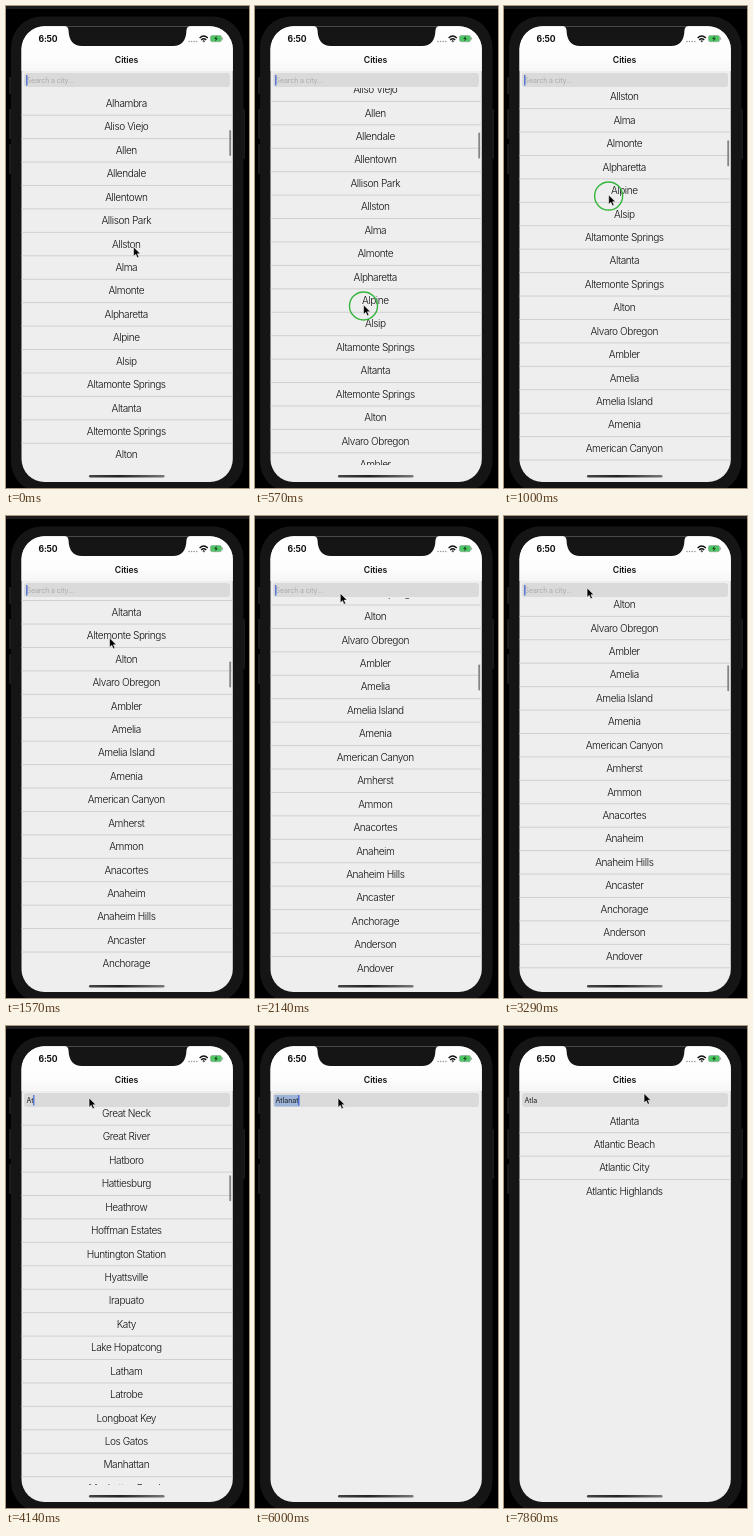
Recreate the animation shown at these times as an HTML page. Size 243 by 482 pixels, loop 8000 ms.

```html
<!DOCTYPE html>
<html lang="en">
<head>
<meta charset="utf-8">
<title>City search</title>
<style>
  html, body { margin: 0; width: 100%; height: 100%; overflow: hidden; background: #000; }
  svg { display: block; width: 100%; height: 100%; font-family: Inter, Roboto, sans-serif; }
  .row { font-size: 10.1px; font-weight: 300; letter-spacing: -.43px; text-anchor: middle; fill: #111; }
  .sep { stroke: #d0d0d0; stroke-width: 1; }
  .field { font-size: 7px; }
</style>
</head>
<body>
<svg viewBox="0 0 243 482" preserveAspectRatio="none">
  <defs>
    <linearGradient id="nav" x1="0" y1="0" x2="0" y2="1">
      <stop offset="0" stop-color="#fff"/>
      <stop offset=".7" stop-color="#fdfdfd"/>
      <stop offset="1" stop-color="#f6f6f6"/>
    </linearGradient>
    <linearGradient id="gloss">
      <stop offset="0" stop-color="#444"/>
      <stop offset=".4" stop-color="#222"/>
      <stop offset="1" stop-color="#777"/>
    </linearGradient>
    <clipPath id="screen"><rect x="15.5" y="20.3" width="211.300" height="455.700" rx="23"/></clipPath>
    <clipPath id="list"><rect x="15" y="82" width="212" height="377"/></clipPath>
  </defs>

  <rect width="243" height="482" fill="#000"/>
  <rect width="243" height="3" fill="#1c1c1c"/>
  <g fill="#1b1b1b">
    <rect x="3" y="71" width="4" height="17" rx="1"/>
    <rect x="3" y="103" width="4" height="30" rx="1"/>
    <rect x="3" y="138" width="4" height="30" rx="1"/>
    <rect x="235" y="103" width="4" height="50" rx="1"/>
  </g>
  <rect x="5" y="10.5" width="232.5" height="476" rx="31" fill="#151515"/>

  <g clip-path="url(#screen)">
    <rect x="15" y="20" width="212" height="456" fill="#eeeeee"/>
    <rect x="15" y="20" width="212" height="45" fill="url(#nav)"/>
    <g clip-path="url(#list)">
      <g id="all"></g>
      <g id="at"></g>
      <g id="atla"></g>
    </g>
    <rect id="bar" x="223.300" width="1.800" height="26" rx=".9" fill="#858585"/>
    <path d="M59 20Q62 20.5 62.500 24Q63 40 76 40H167Q180 40 180.500 24Q181 20.500 184 20Z" fill="#151515"/>
  </g>

  <text x="32.5" y="35.800" font-size="8.6" font-weight="700" fill="#111" letter-spacing="-.2">6:50</text>
  <g fill="#999">
    <circle cx="183" cy="35.500" r=".8"/><circle cx="185.600" cy="35.500" r=".8"/>
    <circle cx="188.200" cy="35.500" r=".8"/><circle cx="190.800" cy="35.500" r=".8"/>
  </g>
  <g fill="none" stroke="#111" stroke-width="1.4">
    <path d="M193.600 32Q197.700 28.200 201.800 32"/>
    <path d="M195.200 33.900Q197.700 31.600 200.200 33.900"/>
    <circle cx="197.700" cy="35.300" r=".3"/>
  </g>
  <rect x="204.500" y="29.500" width="11" height="6.200" rx="1.700" fill="#4cc764" stroke="#8fa895" stroke-width=".7"/>
  <path d="M216.600 31.500v2.200" stroke="#8fa895"/>
  <path d="M210.800 29.600l-2.600 3.400h1.600l-.6 2.600 2.700-3.400h-1.700z" fill="#173d1e"/>
  <text x="120.500" y="56.500" font-size="8.700" font-weight="600" text-anchor="middle" fill="#111" letter-spacing="-.1">Cities</text>

  <rect x="18" y="67" width="206" height="14" rx="3" fill="#dadada"/>
  <rect id="selection" x="19.500" y="69" width="25" height="11.500" fill="#9db3d8"/>
  <text id="hint" class="field" x="20.600" y="76.600" fill="#aaa" letter-spacing="-.1">Search a city...</text>
  <text id="query" class="field" x="20.600" y="76.600" fill="#1c1c1c"></text>
  <rect id="caret" y="69" width="1.200" height="10.500" fill="#3f62d8"/>

  <rect x="83" y="469" width="75.500" height="2.600" rx="1.300" fill="url(#gloss)"/>
  <g id="pointer">
    <circle id="ring" cx="-.5" cy="1" r="14" fill="none" stroke="#34b53e" stroke-width="1.400"/>
    <path d="M-.4 0V9.300L1.800 7.300L3.300 10.800L4.900 10.100L3.400 6.700H6.300Z" fill="#000" stroke="#fff" stroke-width=".5"/>
  </g>
</svg>
<script>
const PITCH = 23.43, LOOP = 8000, STEP = 1000 / 7;
const GRAB = 570, RELEASE = 1190;
const $ = id => document.getElementById(id);

const cities = {
  all: `Alhambra,Aliso Viejo,Allen,Allendale,Allentown,Allison Park,Allston,Alma,Almonte,Alpharetta,Alpine,
    Alsip,Altamonte Springs,Altanta,Altemonte Springs,Alton,Alvaro Obregon,Ambler,Amelia,Amelia Island,Amenia,
    American Canyon,Amherst,Ammon,Anacortes,Anaheim,Anaheim Hills,Ancaster,Anchorage,Anderson,Andover,Angleton`,
  at: `Great Neck,Great River,Hatboro,Hattiesburg,Heathrow,Hoffman Estates,Huntington Station,Hyattsville,
    Irapuato,Katy,Lake Hopatcong,Latham,Latrobe,Longboat Key,Los Gatos,Manhattan,Manhattan Beach`,
  atla: 'Atlanta,Atlantic Beach,Atlantic City,Atlantic Highlands'
};

for (const [id, names] of Object.entries(cities)) {
  $(id).innerHTML = names.split(',').map((name, i) => {
    const y = i * PITCH;
    const line = i ? `<path class="sep" d="M15 ${y - PITCH / 2}h212"/>` : '';
    return `${line}<text class="row" x="120.3" y="${y + 3.5}">${name.trim()}</text>`;
  }).join('');
}
const place = (id, y) => $(id).setAttribute('transform', `translate(0 ${y})`);
place('at', 87.5);
place('atla', 95);

// [start time, text in the field]
const typing = [[0, ''], [3860, 'A'], [4000, 'At'], [4430, 'Atl'], [4570, 'Atla'], [4710, 'Atlan'],
  [5000, 'Atlana'], [5430, 'Atlanat'], [6430, 'Atlana'], [6860, 'Atlan'], [7000, 'Atla']];

// [time, x, y]
const path = [[0, 128, 241], [430, 109, 299], [GRAB, 109, 299], [RELEASE, 104, 122], [1570, 104, 122],
  [2290, 83.5, 72], [7430, 83.5, 72], [7860, 140.5, 67.5], [LOOP, 140.5, 67.5]];

const drag = t => 177 * ((t - GRAB) / (RELEASE - GRAB)) ** 1.3;

// Vertical centre of the first city: coasting, dragged, then flicked
function listTop(t) {
  if (t < GRAB) return 50.7 + 46.8 * Math.exp(-t / 360);
  if (t < RELEASE) return 60.3 - drag(t);
  return -263.5 + 146.8 * Math.exp((RELEASE - t) / 390);
}

function pointerAt(t) {
  const i = path.findIndex(p => p[0] > t);
  const [t0, x0, y0] = path[i - 1], [t1, x1, y1] = path[i];
  const u = (t - t0) / (t1 - t0), e = u * u * (3 - 2 * u);
  const y = t >= GRAB && t < RELEASE ? 299 - drag(t) : y0 + (y1 - y0) * e;
  return [x0 + (x1 - x0) * e, y];
}

const show = (id, on) => $(id).setAttribute('visibility', on ? 'visible' : 'hidden');

function draw(t) {
  const text = typing.filter(k => k[0] <= t + 5).pop()[1];
  const top = listTop(t);
  const list = text.length < 2 ? 'all' : text === 'At' ? 'at' : text.length < 6 ? 'atla' : '';
  Object.keys(cities).forEach(id => show(id, id === list));
  place('all', top);

  $('bar').setAttribute('y', 124 + (97.5 - top) * .07);
  show('bar', text.length < 3);

  $('query').textContent = text;
  show('hint', !text);
  show('selection', t > 5990 && t < 6420);
  $('caret').setAttribute('x', 20.2 + $('query').getComputedTextLength());
  show('caret', t < 7560);

  $('pointer').setAttribute('transform', `translate(${pointerAt(t)})`);
  show('ring', t > 420 && t < RELEASE);
}

function tick() {
  const t = performance.now() % LOOP;
  draw(Math.min(Math.floor((t + 5) / STEP), 55) * STEP);
  requestAnimationFrame(tick);
}
tick();
</script>
</body>
</html>
```
